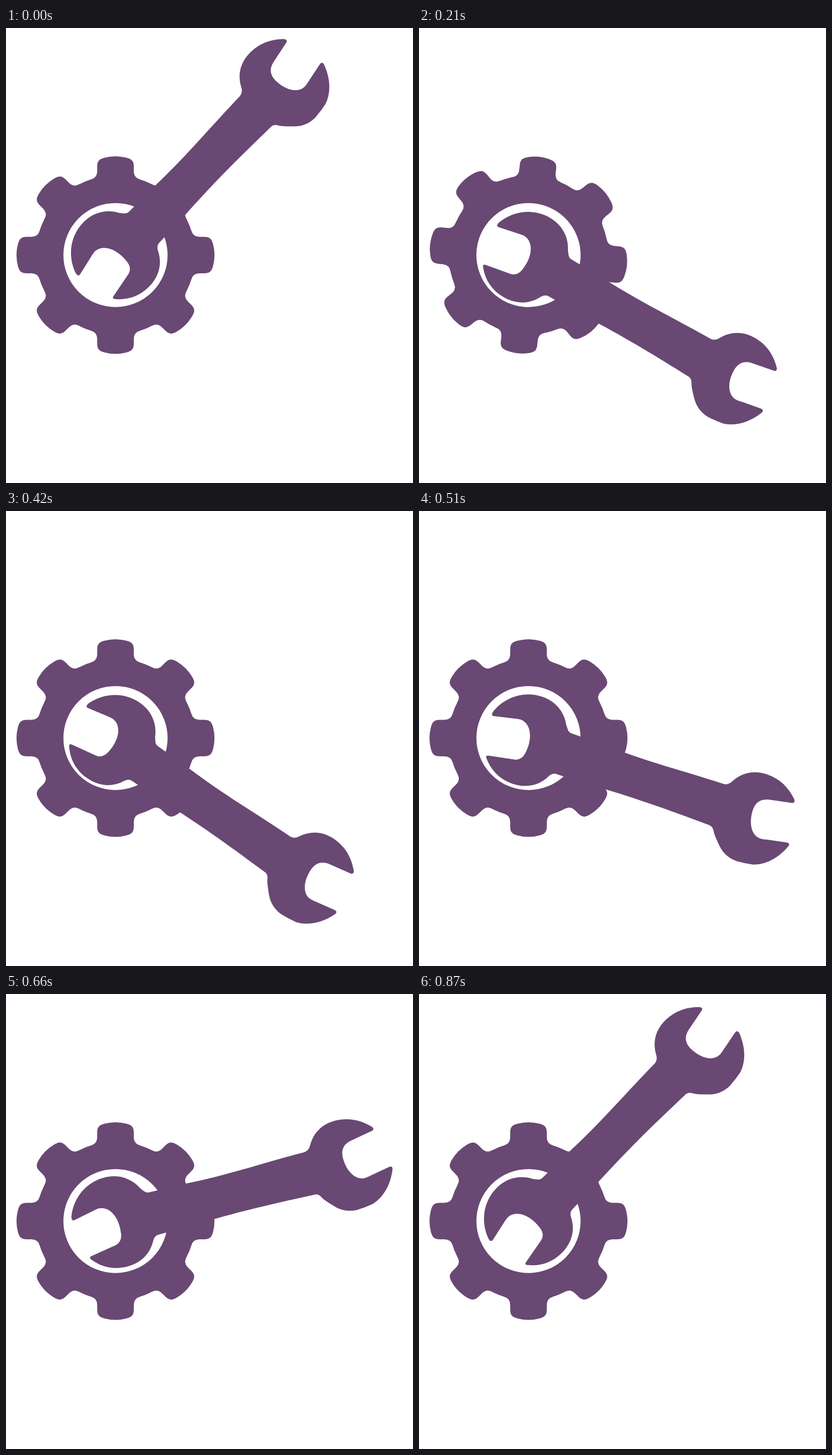
Recreate the animation shown at these times as an HTML page. Size 707 by 792 pixels, loop 900 ms.

```html
<!DOCTYPE html>
<html lang="en">
<head>
<meta charset="utf-8">
<title>Gear and wrench</title>
<style>
  html, body { margin: 0; width: 100%; height: 100%; overflow: hidden; background: #fff; }
  svg { display: block; width: 707px; height: 792px; }
</style>
</head>
<body>
<svg viewBox="0 0 707 792" fill="#694873">
  <defs>
    <path id="tooth" d="M-42 -131.8 Q-31.8 -135 -31.8 -146 V-154 C-31.8 -164 -28 -167 -19 -169.5
      Q0 -174.5 19 -169.5 C28 -167 31.8 -164 31.8 -154 V-146 Q31.8 -135 42 -131.8 L30 -115 H-30 Z"/>
  </defs>
  <g id="gear">
    <circle r="114.5" fill="none" stroke="#694873" stroke-width="48"/>
  </g>
  <path id="wrench" d="M258 361 H325 C400 363 460 357 537 355 Q545 354 549 346
    C560 325 579 314 603 314 C627 314 646 324 661 339 Q665 344 660 346
    L619 354.5 C605 358 599.5 367 599.5 380 C600 405 612 423 628 423 Q632 423 640 421
    L674 414 Q680 413 679 419 C669 446 652 463 632 470 Q618 473 603 474
    C587 474 575 468 566 459 C557 450 550 443 547 437 Q543 431 537 431
    C465 430 410 429 323 434 L271 436 L256 436.5 Q250 437 246 444
    C235 467 214 478 190 478 C166 478 147 468 133 451 Q130 447 135 446
    L181 437 Q192 434 194 421 C198 393 187 368 166 368 L160 369
    L121 378 Q115 379 117 371 C128 340 156 318 190 318
    C214 318 234 330 245 351 C250 357 252 361 258 361 Z"/>
</svg>
<script>
  const LOOP = 900, TURN = 300, STEP = 30;
  const gear = document.getElementById('gear');
  const wrench = document.getElementById('wrench');

  for (let i = 0; i < 8; i++) {
    const tooth = document.createElementNS('http://www.w3.org/2000/svg', 'use');
    tooth.setAttribute('href', '#tooth');
    tooth.setAttribute('transform', `rotate(${i * 45})`);
    gear.append(tooth);
  }

  const cubic = (s, a, b) => 3 * s * (1 - s) ** 2 * a + 3 * s * s * (1 - s) * b + s ** 3;

  function bezier(x, x1, y1, x2, y2) {
    let lo = 0, hi = 1;
    for (let i = 0; i < 24; i++) {
      const mid = (lo + hi) / 2;
      if (cubic(mid, x1, x2) < x) lo = mid; else hi = mid;
    }
    return cubic((lo + hi) / 2, y1, y2);
  }

  const easeInOut = x => bezier(x, 1 / 3, 0, 2 / 3, 1);
  const easeStop = x => bezier(x, 1 / 6, 1 / 6, 2 / 3, 1);

  function draw(now) {
    const t = Math.floor(now % LOOP / STEP) * STEP;
    const push = Math.min(t / TURN, 1);
    const swing = t < TURN ? easeStop(push) : 1 - easeInOut((t - TURN) / (LOOP - TURN));
    gear.setAttribute('transform', `translate(190.2 395.2) rotate(${180 * easeInOut(push)})`);
    wrench.setAttribute('transform', `rotate(${90 * swing - 45} 186 394)`);
  }

  const start = performance.now();
  function tick() {
    draw(performance.now() - start);
    requestAnimationFrame(tick);
  }
  tick();
</script>
</body>
</html>
```
